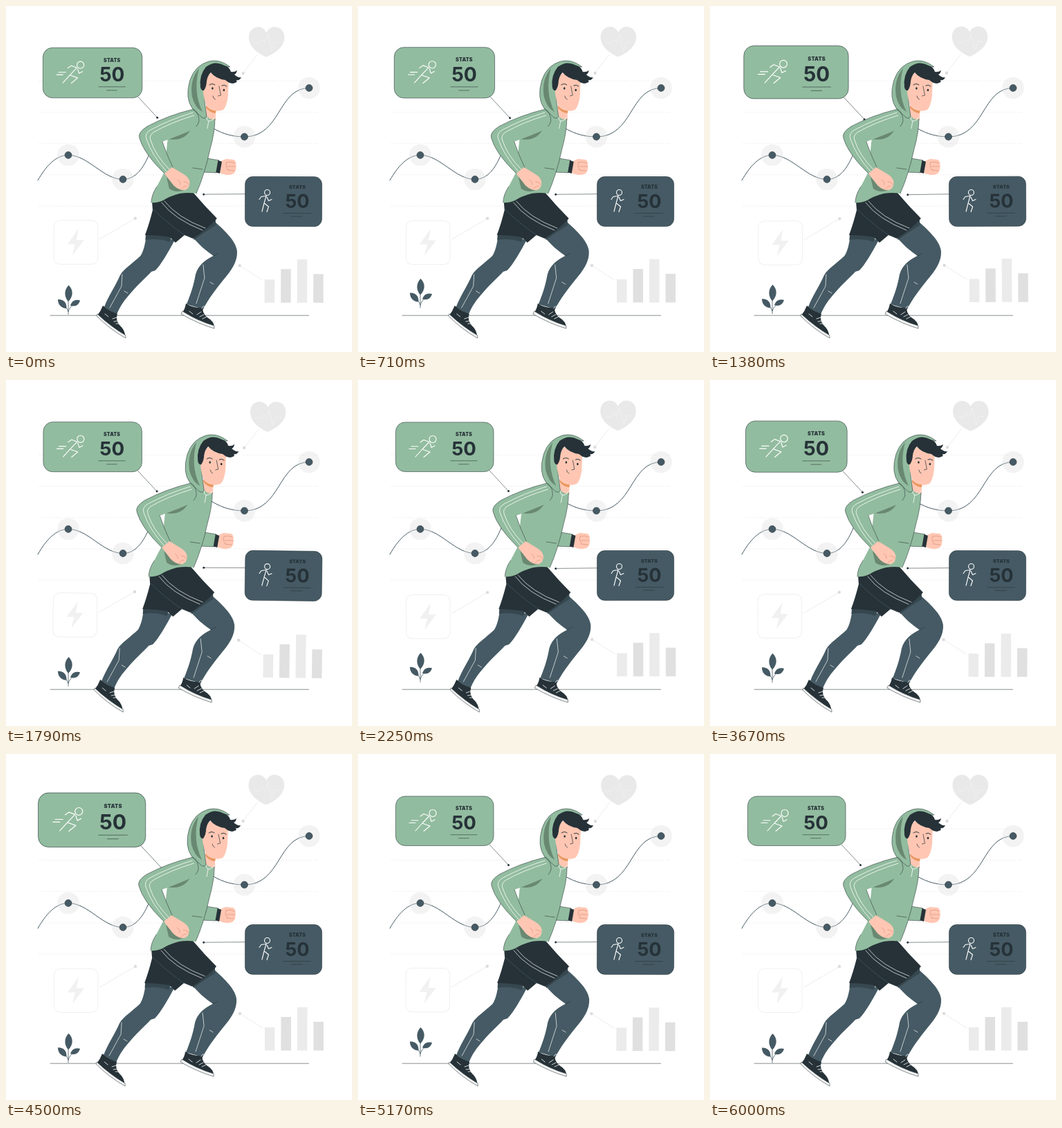
An HTML page for the animation above (6040 ms loop, 500 by 500 pixels).

```html
<!DOCTYPE html>
<html lang="en">
<head>
<meta charset="utf-8">
<title>Running stats</title>
<style>
  html, body { margin: 0; width: 100%; height: 100%; overflow: hidden; background: #fff; }
  svg { display: block; width: 100%; height: 100%; }
  text { font-family: Inter, "Open Sans", sans-serif; text-anchor: middle; fill: #263238; }
  .label { font-size: 7px; font-weight: 900; letter-spacing: .2px; }
  .value { font-weight: 700; }
  .line { fill: none; stroke-linecap: round; stroke-linejoin: round; }
  .ink { stroke: #263238; stroke-width: .55; }
  .bold { stroke: #263238; stroke-width: 1; }
  .white { stroke: #fff; stroke-width: .8; }
  .icon { stroke: #fff; stroke-width: 1.1; }
  .crease { stroke: #d9876d; stroke-width: .6; }
  .green { fill: #92bc9f; }
  .shade { fill: #698872; }
  .slate { fill: #455a64; }
  .deep { fill: #37474f; }
  .dark { fill: #263238; }
  .skin { fill: #ffc7b3; }
  .sole { fill: #f5f5f5; }
</style>
</head>
<body>
<svg viewBox="0 0 500 500">
  <g id="grid" stroke="#ebebeb" stroke-width=".8" stroke-dasharray="2 2"></g>

  <g id="chart">
    <path class="line" stroke="#455a64" stroke-width="1" d="M46 252C58 231 72 215.500 90 215.500C119 215.500 140 250.500 169 250.500C188 250.500 199 233 207 214C222 178 242 160 266 160C285 160 300 189 344.500 189C398 189 392 118.500 438 118.500"/>
  </g>

  <g id="backdrop">
    <path fill="#e9e9e9" d="M376 73.500C367 70 350.500 60 350.500 45C350.500 28 370 25 376 38C382 25 402 28 402 45C402 60 385 70 376 73.500Z"/>
    <path class="line" stroke="#f2f2f2" stroke-width=".8" d="M358 53H366L370 48L374 53L378 41L384 64L388 52H395"/>
    <path class="line" stroke="#e9e9e9" stroke-width=".8" d="M342.500 97L363 70M187 307L136 337M338 375L371 396"/>
    <g fill="#dcdcdc"><circle cx="342.500" cy="97" r="2.200"/><circle cx="187" cy="307" r="2.200"/><circle cx="338" cy="375" r="2.200"/></g>
    <rect x="69.500" y="310" width="63.500" height="63.500" rx="9" fill="#fff" stroke="#f0f0f0"/>
    <path fill="#f1f1f1" d="M105 322L89 344.500H100L96 361L113 338.500H102Z"/>
    <path fill="#ebebeb" d="M374 395h14.500v33.500h-14.500zM421 366h14.500v62.500h-14.500z"/>
    <path fill="#e0e0e0" d="M397.500 380h14.500v48.500h-14.500zM444.500 387h14.500v41.500h-14.500z"/>
  </g>

  <path class="line ink" d="M64 447.200H437.500"/>
  <g id="plant">
    <path class="line" stroke="#455a64" stroke-width=".8" d="M90 446V420M90 442Q88 436 82 432M90 442Q92 435 99 431"/>
    <path class="slate" d="M90.500 404C98 411 97 421 90 427.500C84 421 83.500 411 90.500 404Z"/>
    <path class="slate" d="M75 424.500C83 424 88 429 87.500 437.500C80 437.500 75 432 75 424.500ZM107 426C105 433 100 435.500 93 433.500C95 427 100 424 107 426Z"/>
  </g>

  <g id="greenCard">
    <path class="line ink" d="M190 131L217.500 160.500"/>
    <circle class="dark" cx="217.500" cy="160.500" r="1.500"/>
    <rect class="green ink" x="54.500" y="61" width="141.500" height="71.500" rx="13.500"/>
    <g class="line icon">
      <circle cx="108" cy="85.500" r="5"/>
      <path d="M90 90L95 86.500L103 89.500L93 100L83 111M104 91L106 97.500L111 95M94 100.500L104 104L95 111.500M77 96H87M74 99.500H83"/>
    </g>
    <text class="label" x="153" y="81">STATS</text>
    <text class="value" x="153" y="109" font-size="27.500">50</text>
    <path class="line ink" d="M134 116.700H172M145.500 121.700H160"/>
  </g>

  <g id="slateCard">
    <path class="line ink" d="M286 272.300L346 271.700"/>
    <circle class="dark" cx="285.700" cy="272.300" r="1.500"/>
    <rect class="slate ink" x="345.500" y="246.500" width="111" height="72" rx="11"/>
    <g class="line icon">
      <circle cx="377.500" cy="269.500" r="4"/>
      <path d="M366 279.500L369 275.500L376 274.500L373 285L370 297M377 276L379.500 281.500L384 279.500M374 285.500L379.500 290L377 297.500"/>
    </g>
    <text class="label" x="421" y="264">STATS</text>
    <text class="value" x="421" y="291.500" font-size="27">50</text>
    <path class="line ink" d="M401 299.500H440.500M412.500 304H428"/>
  </g>

  <g id="runner">
    <!-- legs -->
    <path class="slate" d="M203 330C201 345 199 354 194.500 361C184 371 170 380 165 389C158 405 147 421 142 435L160 446C165 433 172 424 181 414C193 400 203 392 210 384L216 382C224 374 235 355 244 338Z"/>
    <path class="deep" d="M202 330L240 332L236 341Q220 335 201.500 338Z"/>
    <path class="slate" d="M267 331C279 345 289 354 300 361C288 367 278 374 274 388C271 405 266 419 261 431L285 438C293 423 302 411 314 396C326 382 335 369 334 354C332 338 314 323 298 308Z"/>
    <path class="deep" d="M268 331L303 308L303 317Q289 325 272 338Z"/>
    <path class="line ink" d="M299 361Q304 360 307 357"/>
    <path class="line white" d="M168 388L167 405L150 436M171 412L176 415M285 374L287 393L275 430M295 399L300 402" opacity=".85"/>
    <!-- shoes -->
    <path class="dark" d="M140 433Q150 441 161 445Q158 453 164 461Q172 468 172.500 478L132 447Q137 441 140 433Z"/>
    <path class="sole ink" d="M132 445Q151 463 173 476V480Q150 467 131 448Z"/>
    <path class="dark" d="M260 430Q271 437 285 436Q283 443 291 450Q301 456 301 464L254 444Q259 438 260 430Z"/>
    <path class="sole ink" d="M255 441Q277 455 301 462V466Q277 459 253 445Z"/>
    <path class="line white" d="M154 452L160 450M156 456L162 455M159 459L165 459M143 445L148 449M276 446L282 442M280 449L286 446M284 452L290 449M265 441L270 445M283 437Q286 431 288 436"/>
    <!-- shorts -->
    <path class="dark" d="M211 282L212 295Q207 315 201 331Q219 331 237 334L245 342L258 331L270 336Q288 325 305 307Q287 289 271 270Q244 265 211 282Z"/>
    <path class="line white" d="M225 284Q243 308 284 324M229 282Q248 306 288 321" opacity=".85"/>
    <path class="line" stroke="#455a64" stroke-width=".7" d="M213 294Q232 313 258 331"/>
    <!-- far arm -->
    <path class="green ink" d="M284 219L308 223L304 241L283 240Z"/>
    <path class="skin" d="M309 225L318 221L329 222Q333 224 332.500 231Q333 241 327 243Q320 246 308 241Z"/>
    <path class="dark" d="M306.500 223L312 225L309 242L303.500 240.500Z"/>
    <path class="line crease" d="M319 226Q325 224 331 227M320 232L332 232M320 237L330 238M319 226Q316 231 321 237"/>
    <!-- torso -->
    <path class="skin" d="M289 143L303 149L303 165L289 163Z"/>
    <path fill="#e9985f" d="M289 144Q297 153 304 150L303 155Q294 154 289 147Z"/>
    <path class="green" d="M271 149L288 155Q293 166 302 163Q302 182 295 207Q287 244 275 271Q264 269 251 271Q236 275 227 281Q217 285 210 284Q210 273 218 261L231 236L231.500 213L234 190Z"/>
    <path class="shade" d="M234 192Q249 185 267 179Q258 194 240 193Z"/>
    <path class="shade" d="M232 247Q245 260 257 266Q246 271 236 264Z"/>
    <path class="line ink" d="M284 236L270 234M302 163Q302 182 295 207Q287 244 275 271M218 261Q210 273 210 284"/>
    <path class="line white" d="M290 160Q290 168 296 166Q300 165 302 161M293 166L291 177"/>
    <!-- near arm -->
    <path class="green" d="M271 149Q234 158 204 174Q190 183 193 191Q199 213 229 242L241 233Q232 214 226 196Q249 188 276 176Z"/>
    <path class="line ink" d="M271 149Q234 158 204 174Q190 183 193 191Q199 213 229 242M241 233Q232 214 226 196"/>
    <path class="line white" d="M270 154Q237 164 209 179Q200 184 203 192Q211 216 232 239M272 158Q239 168 214 182Q206 187 209 194Q216 216 236 236"/>
    <path class="skin" d="M229 242L240 233L255 242Q264 247 265.500 254Q266 263 259 266Q250 267 242 259Q235 250 229 242Z"/>
    <path class="line crease" d="M248 251Q253 254 252 258M254 264Q257 260 261 260M257 254Q264 255 264 258"/>
    <!-- hood and head -->
    <path class="green ink" d="M324 88Q309 76 293 80Q273 86 266 107Q258 133 270 149L280 158Q286 165 290 160L287 137Q283 105 297 89Z"/>
    <path class="shade" d="M279 90Q265 107 269 131Q273 147 284 153Q270 124 279 90Z"/>
    <path class="line ink" d="M271 149Q279 154 279 166Q278 171 275 174"/>
    <path class="skin" d="M285 106Q283 128 290 145Q302 155 314 150Q319 145 321 130L322 104L300 94Z"/>
    <path class="dark" d="M281 117Q279 100 289 88Q302 78 316 86Q323 88 325 95Q330 96 334 93Q333 98 330 99Q335 104 340 103Q338 108 333 107Q335 110 331 111Q325 114 317 107Q303 105 296 96Q291 101 290 109Q290 116 286 122Q282 123 281 117Z"/>
    <g class="dark"><ellipse cx="298.500" cy="119" rx="1.300" ry="1.700"/><ellipse cx="315" cy="121.500" rx="1.300" ry="1.700"/></g>
    <path class="line bold" d="M294 114Q298 111 302 114M312 115Q316 113 319 116"/>
    <path class="line bold" style="stroke-width:.7" d="M308 116L310.500 129L306.500 130M299 130Q299.500 134 302.500 135"/>
  </g>
</svg>
<script>
  const LOOP = 6040, STEPS = 145, CYCLE = 6000;
  const SVG_NS = "http://www.w3.org/2000/svg";
  const byId = id => document.getElementById(id);

  function add(parent, tag, attributes) {
    const node = document.createElementNS(SVG_NS, tag);
    for (const name in attributes) node.setAttribute(name, attributes[name]);
    parent.appendChild(node);
  }

  for (let i = 0; i < 5; i++) {
    const y = 108.3 + i * 45.2;
    add(byId("grid"), "line", { x1: 48, y1: y, x2: 450, y2: y });
  }
  for (const [cx, cy] of [[90, 215.5], [169, 250.5], [344.5, 189], [438, 118.5]]) {
    add(byId("chart"), "circle", { cx, cy, r: 15.8, fill: "#e0e0e0", "fill-opacity": .4 });
    add(byId("chart"), "circle", { cx, cy, r: 5, class: "slate ink" });
  }

  // Piecewise linear keyframes: [progress, value] pairs.
  function track(keys, progress) {
    const i = Math.max(1, keys.findIndex(key => key[0] >= progress));
    const [p0, v0] = keys[i - 1], [p1, v1] = keys[i];
    return v0 + (v1 - v0) * (progress - p0) / (p1 - p0);
  }

  const beat = [[0, 1], [.1, 1.1], [.3, 1], [.4, 1], [.5, 1.1], [.6, 1], [1, 1]];
  const wind = [[0, 0], [.25, 1], [.75, -1], [1, 0]];
  const float = [[0, 0], [.5, -10], [1, 0]];
  const shake = [0, -1, 2, -4, 4, -4, 4, -4, 2, -1, 0].map((x, i) => [i / 10, x]);
  const phase = (time, period) => time % period / period;
  const move = (id, transform) => byId(id).setAttribute("transform", transform);

  function draw(now) {
    const step = Math.floor(now % LOOP / LOOP * STEPS) + 1;
    const time = step / STEPS * CYCLE;
    const angle = track(wind, phase(time, 1500));
    const scale = track(beat, phase(time, 3000));
    move("runner", `translate(${track(shake, phase(time, 6000))} 0)`);
    move("plant", `translate(0 ${track(float, phase(time, 1500))})`);
    move("greenCard", `translate(136.7 111.5) scale(${scale}) translate(-136.7 -111.5)`);
    move("backdrop", `rotate(${angle} 264 229)`);
    move("slateCard", `rotate(${angle} 370.5 282.5)`);
  }

  let start;
  function tick(now) {
    start ??= now;
    draw(now - start);
    requestAnimationFrame(tick);
  }
  draw(0);
  requestAnimationFrame(tick);
</script>
</body>
</html>
```
